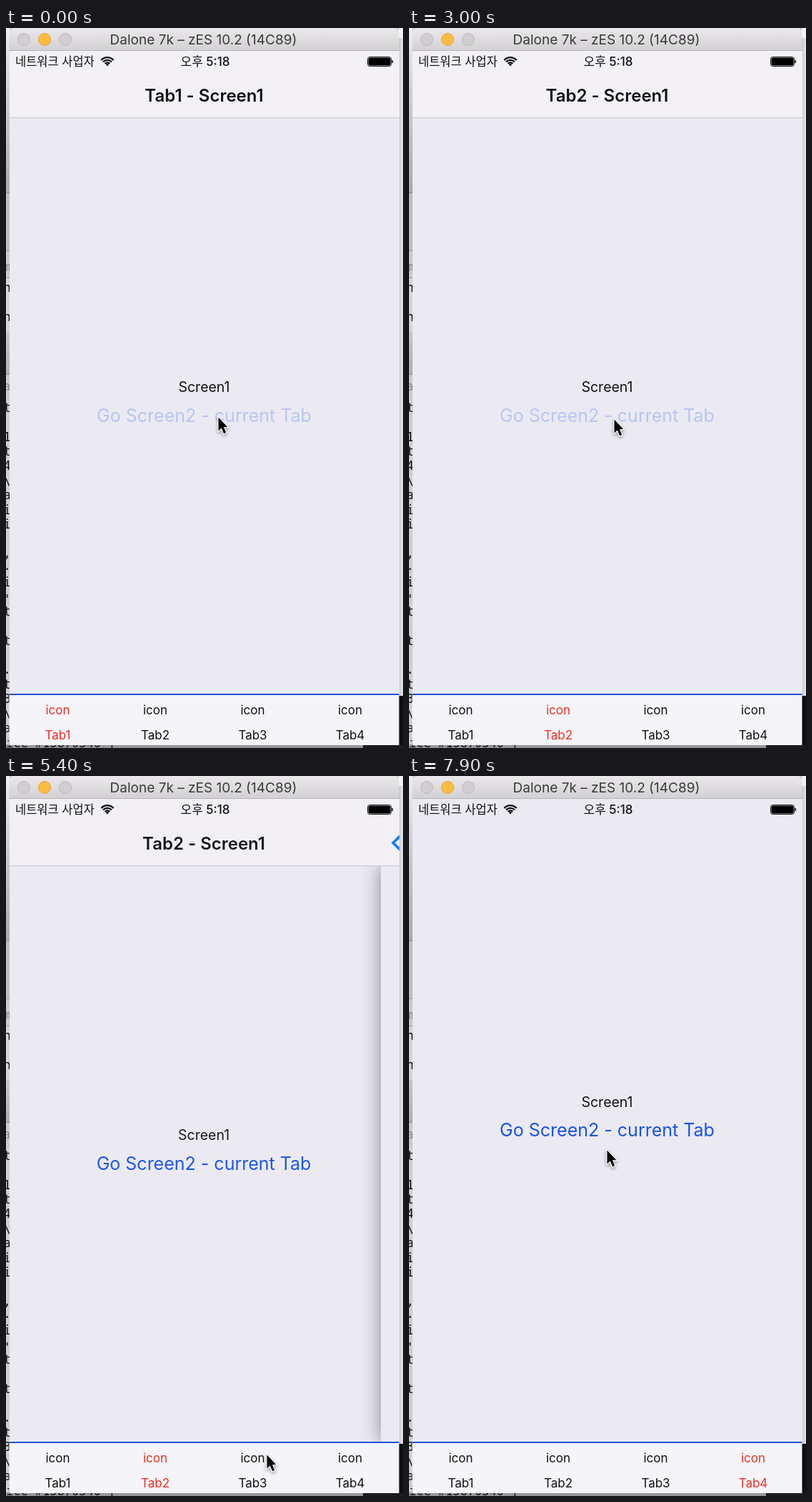
Recreate the animation shown at these times as an HTML page with a canvas. Size 556 by 1007 pixels, loop 8 s.

```html
<!DOCTYPE html>
<html lang="ko">
<head>
<meta charset="utf-8">
<title>Tab navigation</title>
<style>
html, body { margin: 0; width: 100%; height: 100%; overflow: hidden; background: #d9d8da; }
canvas { display: block; width: 556px; height: 1007px; }
</style>
</head>
<body>
<canvas id="stage" width="556" height="1007"></canvas>
<script>
const ctx = document.getElementById('stage').getContext('2d');
const LOOP = 8000, STEP = 100, SLIDE = 500;
const VIEW = { x: 5, y: 32, w: 546, h: 899 };
const HEADER = 93, MID = 277.5;
const SANS = "Inter, 'Noto Sans CJK KR', 'Noto Sans CJK', sans-serif";
const MONO = "'DejaVu Sans Mono', monospace";
const BLUE = '#1652ea', TINT = '#157efb', RED = '#ec2f23', INK = '#111113';

// Each tab: when it is selected, when its second screen is pushed and popped.
const visits = [
  { tab: 1, from: 0, push: 93, pop: 1365 },
  { tab: 2, from: 1950, push: 3125, pop: 5155 },
  { tab: 3, from: 5550, push: 6120, pop: 6878 },
  { tab: 4, from: 7150, push: 1e9, pop: 1e9 }
];

// Pointer path: time, x, y
const pointer = [
  [0, 297, 543], [500, 269, 547], [1400, 269, 547], [1800, 219, 918],
  [1950, 212, 949], [2100, 212, 949], [2700, 287, 546], [3100, 287, 546],
  [3500, 279, 549], [5100, 279, 549], [5400, 365, 948], [5600, 358, 955],
  [6000, 290, 500], [6200, 290, 500], [6500, 284, 508], [6750, 284, 508],
  [6900, 471, 822], [7050, 484, 952], [7250, 484, 952], [7800, 277, 522], [8000, 277, 522]
];

// Glyphs of the window behind, cut off by the left edge: y, character
const behind = [
  [363, 'h'], [404, 'h'], [531, 't'], [572, '1'], [592, 't'], [612, '4'], [633, '\\'],
  [653, 'a'], [674, 'i'], [694, 'i'], [735, ','], [752, '.'], [775, 'i'], [799, "'"],
  [816, 't'], [857, 't'], [897, '.'], [918, 't'], [938, '3'], [958, '\\'], [979, 'a']
];

const clamp = v => Math.max(0, Math.min(1, v));
const bez = (a, b, u) => 3 * a * u * (1 - u) ** 2 + 3 * b * u * u * (1 - u) + u ** 3;

function ease(v) {
  v = clamp(v);
  if (v === 0 || v === 1) return v;
  let lo = 0, hi = 1;
  for (let i = 0; i < 24; i++) {
    const u = (lo + hi) / 2;
    if (bez(0.2833, 0.31833, u) < v) lo = u; else hi = u;
  }
  return bez(0.99, 0.99, lo);
}

function rect(x, y, w, h, fill) {
  ctx.fillStyle = fill;
  ctx.fillRect(x, y, w, h);
}

function clipTo(x, y, w, h) {
  ctx.beginPath();
  ctx.rect(x, y, w, h);
  ctx.clip();
}

function text(str, x, y, size, fill, align = 'center', weight = 400, family = SANS) {
  ctx.font = `${weight} ${size}px ${family}`;
  ctx.textAlign = align;
  ctx.fillStyle = fill;
  ctx.fillText(str, x, y);
}

function fade(x0, y0, x1, y1, ...stops) {
  const g = ctx.createLinearGradient(x0, y0, x1, y1);
  stops.forEach((c, i) => g.addColorStop(i / (stops.length - 1), c));
  return g;
}

function disc(x, y, r, fill, line) {
  ctx.beginPath();
  ctx.arc(x, y, r, 0, 7);
  ctx.fillStyle = fill;
  ctx.fill();
  ctx.strokeStyle = line;
  ctx.lineWidth = 1;
  ctx.stroke();
}

function backdrop() {
  rect(0, 0, 556, 1007, '#cbcacc');
  rect(0, 0, 5, 230, fade(0, 0, 0, 230, '#f0eff0', '#c9c8ca', '#acabad'));
  rect(0, 230, 5, 1, '#8e8d8f');
  rect(0, 231, 5, 80, '#bfbec0');
  rect(0, 311, 5, 1, '#989799');
  rect(0, 349, 5, 1, '#989799');
  rect(0, 350, 5, 75, '#d6d5d7');
  rect(0, 425, 5, 60, fade(0, 425, 0, 485, '#c8c7c9', '#b0afb1'));
  rect(0, 484, 5, 1, '#8e8d8f');
  rect(0, 518, 5, 489, '#cfced0');
  text('m', -4, 340, 17, '#8a898b', 'left', 400, MONO);
  text('a', -4, 507, 17, '#8a898b', 'left', 400, MONO);
  for (const [y, ch] of behind) text(ch, -3.5, y + 6, 17, '#161616', 'left', 400, MONO);
  rect(0, 1002, 556, 5, '#969597');
  text('ice #15870340 |', 0, 1006, 17, '#161616', 'left', 400, MONO);
  rect(550, 0, 6, 935, fade(550, 0, 556, 0, '#bdbcbe', '#d9d8da', '#e6e5e7'));
  rect(550, 0, 6, 14, '#f2f1f3');
  rect(550, 934, 6, 73, '#101011');
  rect(500, 1003, 56, 4, '#1c1c1d');
}

function titleBar() {
  ctx.beginPath();
  ctx.roundRect(4.5, 0, 546, 32, [7, 7, 0, 0]);
  ctx.fillStyle = fade(0, 0, 0, 32, '#eae8ea', '#d2d0d2');
  ctx.fill();
  rect(4.5, 31, 546, 1, '#b6b4b7');
  disc(25, 16, 8.5, '#d0ced0', '#bbb9bb');
  disc(54, 16, 8.5, '#fdbb40', '#e2a337');
  disc(83, 16, 8.5, '#d0ced0', '#bbb9bb');
  text('Dalone 7k – zES 10.2 (14C89)', 276.5, 23, 19, '#3b393b');
}

function statusBar() {
  text('네트워크 사업자', 13, 52.5, 16.5, INK, 'left');
  text('오후 5:18', 279, 53, 17, INK, 'center', 500);

  ctx.strokeStyle = INK;
  ctx.lineWidth = 2.3;
  for (const r of [4.6, 8.2, 11.8]) {
    ctx.beginPath();
    ctx.arc(142, 53, r, -Math.PI * 0.76, -Math.PI * 0.24);
    ctx.stroke();
  }
  ctx.beginPath();
  ctx.moveTo(142, 53.5);
  ctx.arc(142, 53, 3, -Math.PI * 0.76, -Math.PI * 0.24);
  ctx.fillStyle = INK;
  ctx.fill();

  ctx.beginPath();
  ctx.roundRect(506.5, 40.5, 33, 13, 3);
  ctx.lineWidth = 1;
  ctx.stroke();
  ctx.beginPath();
  ctx.roundRect(507.5, 41.5, 31, 11, 2);
  ctx.fillStyle = '#000';
  ctx.fill();
  rect(540.5, 45, 1.5, 4, INK);
}

function header(title, back) {
  rect(VIEW.x, VIEW.y, VIEW.w, HEADER, '#f3f1f5');
  rect(VIEW.x, VIEW.y + HEADER, VIEW.w, 1, '#cac8ce');
  text(title, MID, 102.5, 24, INK, 'center', 600);
  if (!back) return;
  ctx.beginPath();
  ctx.moveTo(35, 81);
  ctx.lineTo(22, 93.5);
  ctx.lineTo(35, 106);
  ctx.strokeStyle = TINT;
  ctx.lineWidth = 3.8;
  ctx.stroke();
  text('Back', 42, 102.5, 24, TINT, 'left');
}

function link(str, y, pressed) {
  const alpha = ctx.globalAlpha;
  if (pressed) ctx.globalAlpha = alpha * 0.24;
  text(str, MID, y, 25, BLUE);
  ctx.globalAlpha = alpha;
}

function screen(no, tab, pressed) {
  const barred = tab < 3, dy = barred ? 0 : -46.5;
  rect(VIEW.x, VIEW.y, VIEW.w, VIEW.h, '#ebeaf3');
  if (barred) header(`Tab${tab} - Screen${no}`, no === 2);
  if (no === 1) {
    text('Screen1', MID, 509 + dy, 19.5, INK);
    link('Go Screen2 - current Tab', 550.5 + dy, pressed);
  } else {
    text('Screen2', MID, 496 + dy, 19.5, INK);
    text('ID : Keen', MID, 521 + dy, 19.5, INK);
    link('Go Back', 563 + dy, pressed);
  }
}

// The card's shadow falls on the content only, never on the header.
function cardShadow(x, tab) {
  const top = VIEW.y + (tab < 3 ? HEADER + 1 : 0), h = VIEW.y + VIEW.h - top;
  ctx.save();
  clipTo(VIEW.x, top, VIEW.w, h);
  ctx.shadowColor = 'rgba(0,0,0,.46)';
  ctx.shadowBlur = 25;
  rect(x, top, VIEW.w, h, '#ebeaf3');
  ctx.restore();
}

function stack(visit, t) {
  const { tab, push, pop } = visit;
  const p = ease((t - push) / SLIDE) - ease((t - pop) / SLIDE);
  const held = at => t >= at - 170 && t < at;

  ctx.save();
  clipTo(VIEW.x, VIEW.y, VIEW.w, VIEW.h);
  rect(VIEW.x, VIEW.y, VIEW.w, VIEW.h, '#fff');

  if (p < 1) {
    ctx.save();
    ctx.globalAlpha = 1 - 0.7 * p;
    ctx.translate(-10 * p, 0);
    screen(1, tab, held(push));
    // keeps the right edge covered while the screen drifts left
    rect(VIEW.x + VIEW.w, VIEW.y, 10, VIEW.h, '#ebeaf3');
    ctx.restore();
  }
  if (p > 0) {
    const shift = VIEW.w * (1 - p);
    cardShadow(VIEW.x + shift, tab);
    ctx.save();
    ctx.translate(shift, 0);
    screen(2, tab, held(pop));
    ctx.restore();
  }
  ctx.restore();
}

function tabBar(active) {
  rect(4.5, 931, 546, 72, '#f5f4f8');
  rect(4.5, 931, 546, 2, '#2450d6');
  for (let i = 1; i <= 4; i++) {
    const x = 72.5 + (i - 1) * 136.5, fill = i === active ? RED : INK;
    text('icon', x, 960, 17, fill);
    text('Tab' + i, x, 995, 17, fill);
  }
}

function cursor(t) {
  const i = pointer.findIndex(k => k[0] > t);
  const [t0, x0, y0] = pointer[i - 1], [t1, x1, y1] = pointer[i];
  const k = (t - t0) / (t1 - t0), s = k * k * (3 - 2 * k);
  ctx.save();
  ctx.translate(x0 + (x1 - x0) * s + 0.5, y0 + (y1 - y0) * s + 1.5);
  ctx.scale(0.95, 0.95);
  ctx.beginPath();
  [[0, 0], [0, 20], [4.5, 15.9], [8, 24], [11.3, 22.6], [7.8, 14.6], [13.4, 14.2]]
    .forEach(p => ctx.lineTo(...p));
  ctx.closePath();
  ctx.shadowColor = 'rgba(0,0,0,.4)';
  ctx.shadowBlur = 4;
  ctx.shadowOffsetY = 2;
  ctx.strokeStyle = '#fff';
  ctx.lineWidth = 2.6;
  ctx.stroke();
  ctx.shadowColor = 'transparent';
  ctx.fillStyle = '#000';
  ctx.fill();
  ctx.restore();
}

function draw(t) {
  const visit = visits.filter(v => v.from <= t).pop();
  backdrop();
  titleBar();
  stack(visit, t);
  statusBar();
  tabBar(visit.tab);
  cursor(t);
}

const start = performance.now();
function tick() {
  const t = (performance.now() - start) % LOOP;
  draw(Math.floor(t / STEP) * STEP);
  requestAnimationFrame(tick);
}
tick();
</script>
</body>
</html>
```
